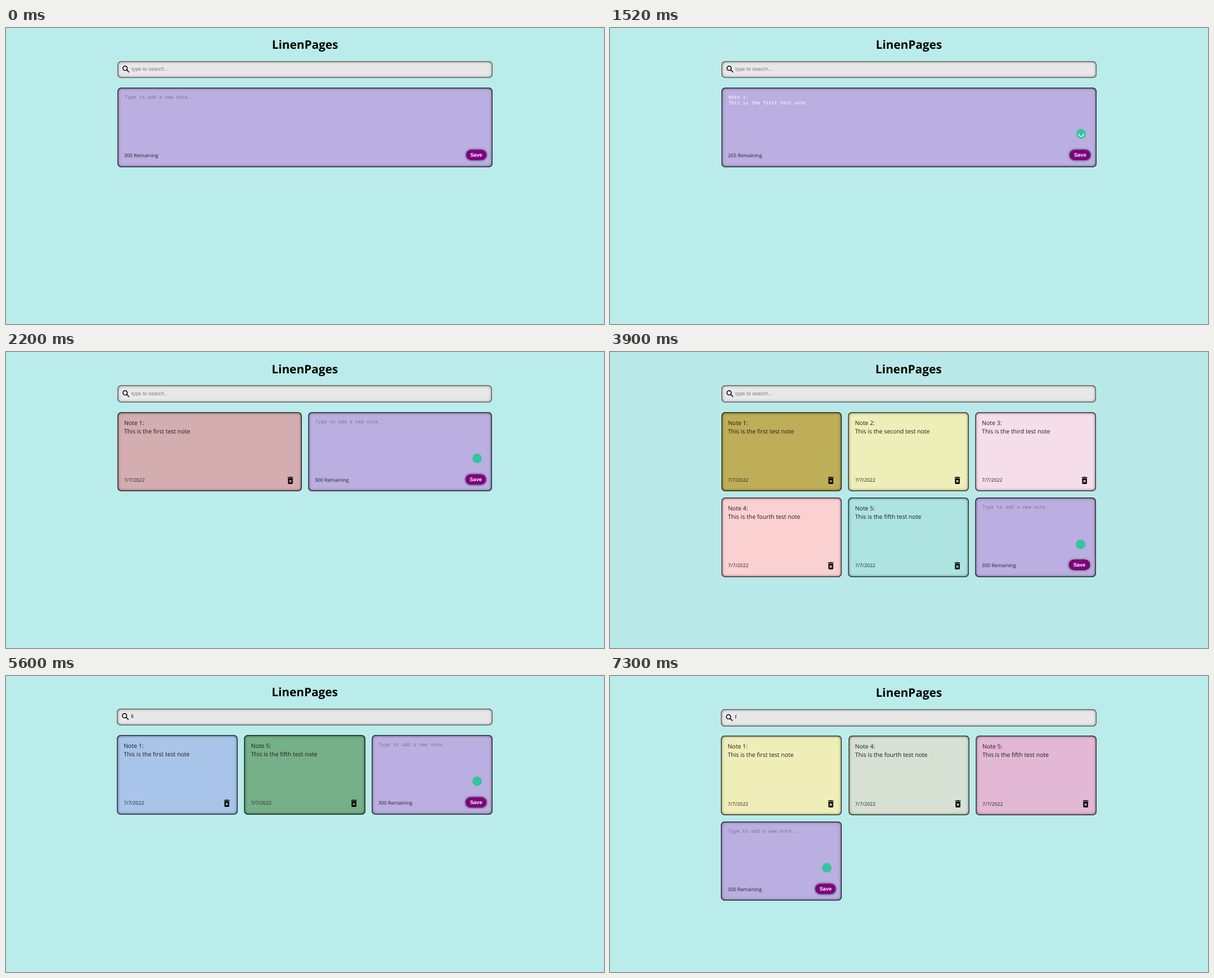
Animation of 1063 by 527 pixels, one loop 8 s. Source, as an HTML page:

```html
<!DOCTYPE html>
<html lang="en">
<head>
<meta charset="utf-8">
<title>LinenPages</title>
<style>
  html, body { margin: 0; width: 100%; height: 100%; overflow: hidden; background: #b9ecea; }
  body { position: relative; text-rendering: geometricPrecision; font-family: "Open Sans", "Noto Sans", sans-serif; }
  svg { position: absolute; width: 17px; height: 17px; }

  .scene { position: absolute; inset: 0; background: var(--bg, #b9ecea); animation: 8s step-end infinite; }
  .scene:nth-child(2) { animation-name: show2; }
  .scene:nth-child(3) { animation-name: show3; }
  .scene:nth-child(4) { animation-name: show4; }
  .scene:nth-child(5) { animation-name: show5; }
  .scene:nth-child(6) { animation-name: show6; }
  /* Scenes are opaque and stacked, so each one only has to appear on time. */
  @keyframes show2 { 0% { visibility: hidden } 6.25%, 100% { visibility: visible } }
  @keyframes show3 { 0% { visibility: hidden } 27.5%, 100% { visibility: visible } }
  @keyframes show4 { 0% { visibility: hidden } 48.75%, 100% { visibility: visible } }
  @keyframes show5 { 0% { visibility: hidden } 70%, 100% { visibility: visible } }
  @keyframes show6 { 0% { visibility: hidden } 91.25%, 100% { visibility: visible } }

  .panel { position: absolute; }
  .panel * { box-sizing: border-box; }
  h1 { position: absolute; top: 16.2px; width: 100%; margin: 0; text-align: center; font-size: 20.8px; line-height: 28px; font-weight: 700; color: #000; }

  .search { position: absolute; top: 58.8px; width: 100%; height: 30.7px; border-radius: 7px; background: #e8e8e8;
    box-shadow: inset 0 0 0 1.5px rgba(0,0,0,.42), inset 0 0 5px 1px rgba(0,0,0,.45); }
  .search svg { left: 7px; top: 6.6px; }
  .search span { position: absolute; left: 25px; top: 8.4px; font: 9.25px/12px "Liberation Sans", Arial, sans-serif; color: #0c0c24; white-space: pre; }
  .search .hint { color: #7b7b7b; }

  .grid { position: absolute; top: 106.2px; width: 100%; display: grid; gap: 11.1px; grid-auto-rows: 141.5px; }
  .card { position: relative; border-radius: 7px; white-space: pre;
    box-shadow: inset 0 0 0 1.7px rgba(0,0,0,.52), inset 0 0 5.5px 1px rgba(0,0,0,.6); }
  .text { position: absolute; left: 12px; top: 12.9px; font-size: 10.5px; line-height: 15.1px; color: #1c1a1c; }
  .foot { position: absolute; left: 12px; top: 115.2px; font-size: 8.75px; line-height: 12px; color: #252129; }
  .card > svg { right: 11.6px; top: 112.9px; }

  .new { background: #bbaee0; }
  .draft { position: absolute; left: 13px; top: 12.9px; font: 8.47px/10.4px "Noto Sans Mono", "DejaVu Sans Mono", monospace; color: #fff; }
  .draft.hint { color: #7d7590; }
  .save { position: absolute; right: 11px; top: 111.2px; width: 36.5px; height: 18px; border-radius: 9px; background: #800080; color: #fff;
    font: 700 9.25px/18px "Liberation Sans", Arial, sans-serif; text-align: center; box-shadow: 0 0 3.5px .5px rgba(0,0,0,.8); }
  .save.focus { box-shadow: 0 0 0 .7px #15101a, 0 0 0 1.4px #ddd, 0 0 3.5px 1px rgba(0,0,0,.8); }
  .badge { position: absolute; right: 18.6px; top: 74.3px; width: 17px; height: 17px; border-radius: 50%; background: #34c49e; }
</style>
</head>
<body>
<script>
const ordinals = ["first", "second", "third", "fourth", "fifth"];

const lens = `<svg viewBox="0 0 24 24" fill="none" stroke="#000" stroke-width="2.1">
  <circle cx="9.5" cy="9.5" r="5.5"/><path d="M13.6 13.6 19.7 19.7"/></svg>`;
const bin = `<svg viewBox="0 0 24 24"><path fill-rule="evenodd" d="M6 19c0 1.1.9 2 2 2h8c1.1 0 2-.9 2-2V7H6z
  M8.46 11.88l1.41-1.41L12 12.59l2.12-2.12 1.41 1.41L13.41 14l2.12 2.12-1.41 1.41L12 15.41l-2.12 2.12-1.41-1.41L10.59 14z
  M15.5 4l-1-1h-5l-1 1H5v2h14V4z"/></svg>`;
const spinner = `<svg viewBox="0 0 17 17" fill="none" stroke="#fff" stroke-width="1.3" stroke-linecap="round">
  <path d="M4.3 7.8A4.3 4.3 0 1 0 12.7 7.8"/></svg>`;

// left, right: panel edges; top: vertical nudge; notes: [number, colour]
const scenes = [
  { left: 198, right: 865.2, top: 0, cols: 1, notes: [] },
  { left: 197.7, right: 865, top: 0, cols: 1, notes: [], draft: noteText(1), badge: spinner },
  { left: 198, right: 864.4, top: .6, cols: 2, notes: [[1, "#d4adb0"]], badge: "" },
  { left: 197.7, right: 863.7, top: .5, cols: 3, badge: "", focus: true, bg: "#b8e9e8",
    notes: [[1, "#beae57"], [2, "#eeeeb8"], [3, "#f5deea"], [4, "#fbd0d1"], [5, "#ade4e1"]] },
  { left: 197.2, right: 865, top: -1.2, cols: 3, badge: "", query: "fi",
    notes: [[1, "#a9c4e9"], [5, "#76b088"]] },
  { left: 197.2, right: 865.3, top: .2, cols: 3, badge: "", query: "f",
    notes: [[1, "#f0eeb8"], [4, "#d6e1d3"], [5, "#e2b8d4"]] }
];

function noteText(n) {
  return `Note ${n}:\nThis is the ${ordinals[n - 1]} test note`;
}

function field(cls, value, hint) {
  return `<span class="${cls}${value ? "" : " hint"}">${value || hint}</span>`;
}

function noteCard([n, color]) {
  return `<div class="card" style="background:${color}"><div class="text">${noteText(n)}</div>` +
    `<div class="foot">7/7/2022</div>${bin}</div>`;
}

function newCard({ draft = "", badge, focus }) {
  const left = 300 - draft.length;
  return `<div class="card new">${field("draft", draft, "Type to add a new note...")}` +
    (badge === undefined ? "" : `<div class="badge">${badge}</div>`) +
    `<div class="foot">${left} Remaining</div><div class="save${focus ? " focus" : ""}">Save</div></div>`;
}

function sceneHtml(s) {
  return `<div class="scene"${s.bg ? ` style="--bg:${s.bg}"` : ""}>
    <div class="panel" style="left:${s.left}px;top:${s.top}px;width:${s.right - s.left}px">
      <h1>LinenPages</h1>
      <div class="search">${lens}${field("", s.query, "type to search...")}</div>
      <div class="grid" style="grid-template-columns:repeat(${s.cols},minmax(0,1fr))">${s.notes.map(noteCard).join("")}${newCard(s)}</div>
    </div></div>`;
}

document.body.innerHTML = scenes.map(sceneHtml).join("");
</script>
</body>
</html>
```
